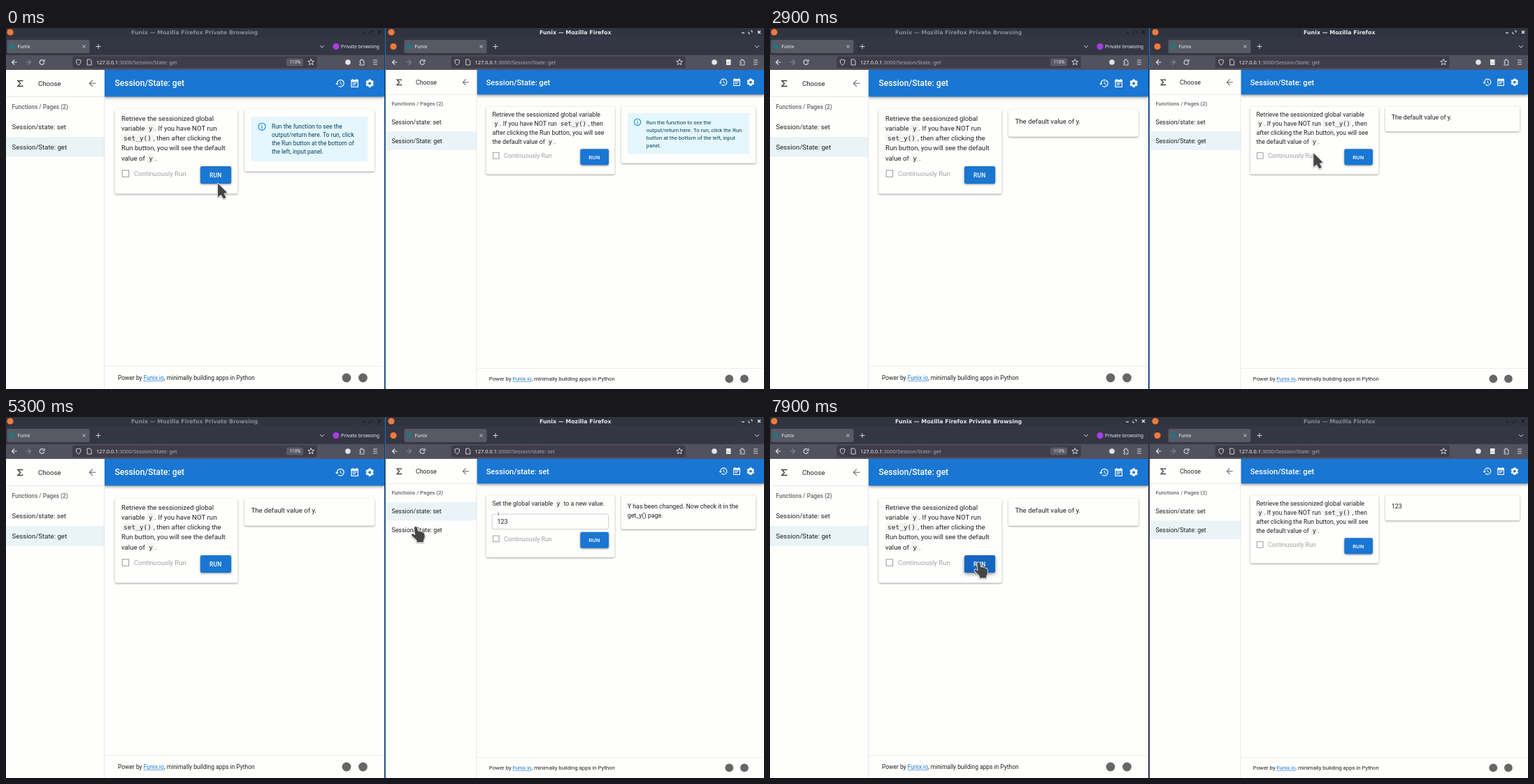
These frames come from a looping animation (1084x517 px, 8 s). An HTML page with a canvas:

```html
<!DOCTYPE html>
<html lang="en">
<head>
<meta charset="utf-8">
<title>Session state demo</title>
<style>
html, body { margin: 0; width: 100%; height: 100%; overflow: hidden; background: #fefefd; }
canvas { display: block; width: 1084px; height: 517px; }
</style>
</head>
<body>
<canvas id="stage"></canvas>
<script>
const W = 1084, H = 517, LOOP = 8000, STEP = 100;
const canvas = document.getElementById('stage');
const dpr = window.devicePixelRatio || 1;
canvas.width = W * dpr;
canvas.height = H * dpr;
const c = canvas.getContext('2d');

const UI = '"Noto Sans", sans-serif', TITLE = '"DejaVu Sans", sans-serif';
const BODY = 'Roboto, sans-serif', MONO = '"DejaVu Sans Mono", monospace';
const BLUE = '#1976d2', DARK_BLUE = '#1565c0', PAPER = '#fefefd', INK = '#212121';
const BASE = 9.65, SMALL = 8.46;
const TOP = 60, RIGHT_X = 543.6, ZOOM = 1.087;

const INFO = 'info';
const DEFAULT = ['The default value of y.'];
const CHANGED = ['Y has been changed. Now check it in the', 'get_y() page.'];
const NUMBER = ['123'];

// Cursor stops: time, x, y
const PATH = [
  [0, 303, 222.5], [100, 304, 221], [500, 304, 221], [600, 303.5, 220], [1300, 303.5, 220],
  [1500, 350, 222], [1800, 640, 213], [2000, 815, 196], [2200, 840.5, 190], [2500, 840.5, 190],
  [2700, 845, 201], [2800, 830, 198], [3100, 672, 142], [3200, 654, 136], [3400, 656, 139],
  [3500, 682, 150], [3800, 815, 172], [4000, 844, 177], [4200, 846.7, 178], [4600, 846.7, 178],
  [4800, 785, 172], [5100, 620, 148], [5300, 586, 157], [6000, 586, 157], [6100, 600, 158],
  [6300, 808, 179], [6400, 836, 184], [6500, 842, 186], [6800, 842, 186], [7000, 690, 195],
  [7300, 106, 203], [7500, 205, 207], [7700, 298, 208.5], [8000, 298.5, 208]
];
const RIPPLES = [
  { start: 3200, release: 3500, x: 654, y: 136, row: 0 },
  { start: 6000, release: 6050, x: 590, y: 157, row: 1 }
];

function cursorAt(t) {
  const i = PATH.findIndex(p => p[0] > t);
  const a = PATH[i - 1], b = PATH[i], k = (t - a[0]) / (b[0] - a[0]);
  return { x: a[1] + (b[1] - a[1]) * k, y: a[2] + (b[2] - a[2]) * k };
}

function rightState(t) {
  const page = t >= 3400 && t < 6100 ? 'set' : 'get';
  const out = t < 2600 ? INFO : t < 3400 ? DEFAULT : t < 4600 ? INFO
    : t < 6100 ? CHANGED : t < 6800 ? INFO : NUMBER;
  return { page, out };
}

const inBox = (p, x, y, w, h) => p.x >= x && p.x < x + w && p.y >= y && p.y < y + h;

function text(s, x, y, size, color, font = BODY, weight = 400) {
  c.font = `${weight} ${size}px ${font}`;
  c.fillStyle = color;
  c.fillText(s, x, y + size * 0.355);
  return c.measureText(s).width;
}
function rect(x, y, w, h, color) {
  c.fillStyle = color;
  c.fillRect(x, y, w, h);
}
function round(x, y, w, h, r, color) {
  c.beginPath();
  c.roundRect(x, y, w, h, r);
  c.fillStyle = color;
  c.fill();
}
function dot(x, y, r, color) {
  c.beginPath();
  c.arc(x, y, r, 0, 7);
  c.fillStyle = color;
  c.fill();
}
function line(color, width, ...paths) {
  c.strokeStyle = color;
  c.lineWidth = width;
  c.beginPath();
  for (const p of paths) {
    for (let i = 0; i < p.length; i += 2) i ? c.lineTo(p[i], p[i + 1]) : c.moveTo(p[i], p[i + 1]);
  }
  c.stroke();
}
function ring(x, y, r, color, width, from = 0, to = Math.PI * 2) {
  c.beginPath();
  c.arc(x, y, r, from, to);
  c.strokeStyle = color;
  c.lineWidth = width;
  c.stroke();
}
function shadow(blur, dy, alpha) {
  c.shadowColor = `rgba(0,0,0,${alpha})`;
  c.shadowBlur = blur * dpr;
  c.shadowOffsetY = dy * dpr;
}
function at(x, y, draw) {
  c.save();
  c.translate(x, y);
  draw();
  c.restore();
}
function raised(x, y, w, h, r, color, blur, dy, alpha) {
  c.save();
  shadow(blur, dy, alpha);
  round(x, y, w, h, r, color);
  c.restore();
}

// Text with `code` spans
function rich(s, x, y) {
  s.split('`').forEach((part, i) => {
    if (i % 2) {
      c.font = `9.5px ${MONO}`;
      const w = c.measureText(part).width;
      round(x, y - 6, w + 6, 12, 2, '#f4f4f3');
      text(part, x + 3, y, 9.5, INK, MONO);
      x += w + 6;
    } else x += text(part, x, y, BASE, INK);
  });
}

function arrowIcon(x, y, dir, color, r = 3.6) {
  line(color, 1.1, [x - r * dir, y, x + r * dir, y], [x, y - r, x + r * dir, y, x, y + r]);
}
function crossIcon(x, y, r, color, width = 0.9) {
  line(color, width, [x - r, y - r, x + r, y + r], [x + r, y - r, x - r, y + r]);
}
function starIcon(x, y) {
  const p = [];
  for (let i = 0; i <= 10; i++) {
    const a = i * Math.PI / 5 - Math.PI / 2, r = i % 2 ? 2 : 4.6;
    p.push(x + r * Math.cos(a), y + r * Math.sin(a));
  }
  line('#e6e6ea', 0.9, p);
}

function chrome(o) {
  const { x, w, focus } = o, light = '#e4e4e9';
  rect(x, 0, w, 13, '#2f343f');
  rect(x, 13, w, 25, '#343743');
  rect(x, 38, w, TOP - 38, '#52525e');
  rect(x, 38, w, 0.6, '#292a33');
  dot(x + (o.right ? 8 : 6), 6, 4.6, '#f5793a');
  text(o.title, o.titleX, 6, 7.88, focus ? '#e9eaec' : '#878b94', TITLE, 700);

  const ctl = focus ? '#f0f0f0' : '#171a20', e = x + w;
  line(ctl, 1.2, [e - 32, 7, e - 28, 7]);
  line(ctl, 1, [e - 20, 8, e - 22, 8, e - 22, 5.5], [e - 19, 4, e - 17, 4, e - 17, 6.5]);
  crossIcon(e - 7, 6, 2, ctl, 1.2);

  const tab = o.tab;
  round(tab, 17, 118, 19, 2.5, '#595964');
  dot(tab + 7, 26.5, 4.2, '#27737f');
  text('Funix', tab + 15, 26.5, 7.1, '#f1f1f3', UI);
  crossIcon(tab + 110, 26.5, 2, light);
  line(light, 0.9, [tab + 127, 26.5, tab + 134, 26.5], [tab + 130.5, 23, tab + 130.5, 30]);
  line(light, 0.9, [o.chevron - 3, 25, o.chevron, 28, o.chevron + 3, 25]);
  if (o.right) dot(554, 26.5, 4.6, '#f5793a');
  else {
    dot(472, 26.5, 4.6, '#a63fe8');
    text('Private browsing', 479, 26.5, 7, '#e8e8ec', UI);
  }

  const n = o.nav;
  arrowIcon(n, 49, -1, light, 3.5);
  arrowIcon(n + 20, 49, 1, '#85858f', 3.5);
  ring(n + 39.5, 49, 3.3, light, 1.1, 0.3, 5.4);
  line(light, 1.1, [n + 43, 45, n + 43, 48, n + 40, 48]);

  const f = o.field;
  round(f, 40.5, o.fieldW, 17, 2.5, '#3e3d49');
  c.beginPath();
  c.moveTo(f + 8.5, 45);
  c.lineTo(f + 12, 46.3);
  c.quadraticCurveTo(f + 12, 51.5, f + 8.5, 53.3);
  c.quadraticCurveTo(f + 5, 51.5, f + 5, 46.3);
  c.closePath();
  c.strokeStyle = light;
  c.lineWidth = 0.9;
  c.stroke();
  line(light, 0.9, [f + 21, 45, f + 25, 45, f + 27, 47, f + 27, 53, f + 21, 53, f + 21, 45]);
  const host = text('127.0.0.1', f + 33.8, 49, 7.45, '#f4f4f6', UI);
  text(`:3000/${o.page === 'set' ? 'Session/state: set' : 'Session/State: get'}`,
    f + 33.8 + host, 49, 7.45, '#adadb6', UI);
  if (!o.right) {
    round(401, 43.5, 24, 11, 2, '#5b5b66');
    text('110%', 405.5, 49, 6.3, '#ececf0', UI);
  }
  starIcon(f + o.fieldW - 8.5, 49);

  const m = o.menu;
  dot(o.pocket, 49, 3.8, light);
  if (o.right) {
    rect(1030, 45, 6.5, 8, '#eeeef0');
    line('#777', 0.6, [1031, 50, 1035.5, 50]);
  }
  line(light, 0.9, [m - 22, 47, m - 20.5, 47, m - 20.5, 45, m - 18, 45, m - 18, 47, m - 16, 47,
    m - 16, 53, m - 22, 53, m - 22, 51, m - 20, 50, m - 22, 49, m - 22, 47]);
  line(light, 0.9, [m - 3, 46, m + 3, 46], [m - 3, 49, m + 3, 49], [m - 3, 52, m + 3, 52]);
}

function barIcons(w) {
  const x = w - 63.3, y = 19.2;
  ring(x + 0.6, y, 4.9, '#fff', 1.25, -Math.PI, 2.3);
  line('#fff', 1, [x + 0.5, y - 2.7, x + 0.5, y + 0.4, x + 3, y + 1.9]);
  c.fillStyle = '#fff';
  c.beginPath();
  c.moveTo(x - 6.8, y);
  c.lineTo(x - 2, y);
  c.lineTo(x - 4.4, y + 2.6);
  c.fill();

  at(w - 42.3, y, () => {
    c.strokeStyle = '#fff';
    c.lineWidth = 1.2;
    c.strokeRect(-4.7, -4.4, 9.4, 9.6);
    rect(-5, -5, 10, 3, '#fff');
    rect(-3.6, -6.3, 1.3, 2, '#fff');
    rect(2.3, -6.3, 1.3, 2, '#fff');
    rect(-2.9, -0.8, 5.8, 1.2, '#fff');
    rect(-2.9, 1.6, 4, 1.2, '#fff');
  });

  at(w - 20.8, y, () => {
    ring(0, 0, 3.4, '#fff', 2.7);
    for (let i = 0; i < 6; i++) {
      c.rotate(Math.PI / 3);
      rect(-1.6, -5.8, 3.2, 2.4, '#fff');
    }
  });
}

function alertBox(x, w) {
  round(x, 67, w, 64, 2, '#e5f6fd');
  ring(x + 15.5, 81.3, 5.1, '#0288d1', 1.1);
  rect(x + 14.9, 80.6, 1.2, 3.6, '#0288d1');
  rect(x + 14.9, 78.2, 1.2, 1.2, '#0288d1');
}

function sidebar(o) {
  rect(0, 0, 141, o.h, PAPER);
  line('#444', 1.5, [23.6, 16.6, 23.6, 15.4, 17, 15.4, 20.6, 19.4, 17, 23.4, 23.6, 23.4, 23.6, 22.2]);
  text('Choose', 46, 19.2, BASE, INK);
  arrowIcon(124, 19.2, -1, '#666', 4.6);
  rect(0, 38, 141, 0.7, '#dfdfdf');
  text('Functions / Pages (2)', 8.5, 53, 8.36, '#666', BODY, 500);
  rect(0, o.page === 'set' ? 67.3 : 96, 141, 28.6, '#e9f3f8');
  for (const r of o.ripples || []) {
    const age = o.t - r.start;
    const alpha = 0.2 * Math.min(1, 1 - (o.t - r.release) / 420);
    if (age < 0 || alpha <= 0) continue;
    c.save();
    c.beginPath();
    c.rect(0, r.row ? 96 : 67.3, 141, 28.6);
    c.clip();
    const grow = 1 - (1 - Math.min(1, age / 550)) ** 1.25;
    dot((r.x - RIGHT_X) * ZOOM, (r.y - TOP) * ZOOM, 135 * grow, `rgba(0,0,0,${alpha})`);
    c.restore();
  }
  text('Session/state: set', 8.5, 81.6, BASE, INK);
  text('Session/State: get', 8.5, 110.3, BASE, INK);
  rect(140.3, 0, 0.7, o.h, '#dcdcdc');
}

// Page body in its own units, origin at the page's top left
function page(o) {
  const { w, h } = o, set = o.page === 'set';
  rect(0, 0, w, h, PAPER);

  raised(155.5, 57, o.cardW, o.cardH, 2.5, PAPER, 2.5, 1, 0.38);
  if (set) {
    rich('Set the global variable `y` to a new value.', 165, 69.4);
    c.beginPath();
    c.roundRect(164.8, 86, 180.8, 23.4, 2.5);
    c.strokeStyle = '#bdbdbd';
    c.lineWidth = 0.8;
    c.stroke();
    rect(171, 84, 7, 4, PAPER);
    text('x', 172.6, 86, 7.2, '#666');
    text('123', 172.8, 97.8, BASE, INK);
  } else o.lines.forEach((s, i) => rich(s, 165, 69.4 + i * 14.2));

  const by = 57 + o.cardH - 39.5, bx = 155.5 + o.cardW - 53.6;
  c.strokeStyle = '#a8a8a8';
  c.lineWidth = 1.2;
  c.strokeRect(166.2, by + 5.8, 9.4, 9.4);
  text('Continuously Run', 183, by + 10.5, BASE, '#a2a2a2');
  raised(bx, by, 44.2, 25, 2.5, o.hover ? DARK_BLUE : BLUE, o.hover ? 5 : 3, o.hover ? 2 : 1, 0.42);
  c.letterSpacing = '0.24px';
  text('RUN', bx + 13, by + 12.7, SMALL, '#fff', BODY, 500);
  c.letterSpacing = '0px';

  const info = o.out === INFO;
  const outH = info ? 88.4 : o.out.length > 1 ? 52.4 : 38.8;
  raised(o.outX, 57, o.outW, outH, 2.5, PAPER, 2.5, 1, 0.38);
  if (info) {
    alertBox(o.outX + 9.6, o.outW - 19.4);
    o.help.forEach((s, i) => text(s, o.outX + 39, 81.3 + i * 11.95, SMALL, '#014361'));
  } else o.out.forEach((s, i) => text(s, o.outX + 9.5, 73.8 + i * 14.2, BASE, INK));

  rect(141, h - 32.6, w - 141, 0.7, '#e6e6e6');
  let fx = 160;
  fx += text('Power by ', fx, h - 16, SMALL, INK);
  const linkW = text('Funix.io', fx, h - 16, SMALL, BLUE);
  rect(fx, h - 12, linkW, 0.6, BLUE);
  text(', minimally building apps in Python', fx + linkW, h - 16, SMALL, INK);
  dot(w - 54, h - 16, 6.4, '#666');
  dot(w - 30.5, h - 16, 6.4, '#666');

  c.save();
  shadow(4, 1.5, 0.4);
  rect(141, 0, w - 141, 38.4, BLUE);
  c.restore();
  sidebar(o);
  text(set ? 'Session/state: set' : 'Session/State: get', 155.5, 19.2, 12.08, '#fff', BODY, 500);
  barIcons(w);
}

const ARROW = new Path2D('M0 0V19.5L4.5 16.2 8.2 22 11.6 20.2 8.6 14.6 13 13Z');
const HAND = new Path2D('M-2 1.2Q0-1.4 2 1.2L3 7Q5 5.8 6.6 7.6 8.6 6.8 9.8 8.8 12 8.4 12.4 11' +
  'L12.8 15Q12.6 17.4 11 19V22.3H1.5V19.6L-5.8 12.4Q-6.2 9.6-3.4 10.4L-.8 12.4Z');

function pointer(p, hand) {
  at(p.x, p.y, () => {
    const shape = hand ? HAND : ARROW;
    c.lineJoin = 'round';
    c.save();
    shadow(2, 1, 0.35);
    c.strokeStyle = '#f4f4f4';
    c.lineWidth = 1.6;
    c.stroke(shape);
    c.restore();
    c.fillStyle = '#454545';
    c.fill(shape);
  });
}

const LEFT = {
  x: 0, w: 541, title: 'Funix — Mozilla Firefox Private Browsing', titleX: 179, tab: 1.5,
  chevron: 452, nav: 12, field: 95.2, fieldW: 349.5, pocket: 489, menu: 528
};
const RIGHT = {
  x: 543, w: 541, right: true, title: 'Funix — Mozilla Firefox', titleX: 763, tab: 569.5,
  chevron: 1074, nav: 556, field: 636.7, fieldW: 335, pocket: 1013, menu: 1072
};
const LEFT_PAGE = {
  w: 541, h: 457, cardW: 176, cardH: 120.5, outX: 341, outW: 186,
  lines: ['Retrieve the sessionized global', 'variable `y`. If you have NOT run',
    '`set_y()`, then after clicking the', 'Run button, you will see the default', 'value of `y`.'],
  help: ['Run the function to see the', 'output/return here. To run, click',
    'the Run button at the bottom of', 'the left, input panel.']
};
const RIGHT_PAGE = {
  w: 587.4, h: 496.8, cardW: 200, outX: 365.6, outW: 209,
  lines: ['Retrieve the sessionized global variable', '`y`. If you have NOT run `set_y()`, then',
    'after clicking the Run button, you will see', 'the default value of `y`.'],
  help: ['Run the function to see the', 'output/return here. To run, click the Run',
    'button at the bottom of the left, input', 'panel.']
};

function draw(t) {
  const cur = cursorAt(t), right = rightState(t);
  const leftFocus = (t >= 1000 && t < 2300) || t >= 7800;
  const hoverL = inBox(cur, 278, 198, 44, 24);
  const hoverR = inBox(cur, 821, right.page === 'set' ? 165 : 173.5, 41, 23);
  const onRow = inBox(cur, 543, 122, 130, 52) || inBox(cur, 0, 127, 141, 57);

  c.setTransform(dpr, 0, 0, dpr, 0, 0);
  rect(0, 0, W, H, PAPER);
  at(0, TOP, () => page({
    ...LEFT_PAGE, t, page: 'get', hover: hoverL, out: t < 1400 ? INFO : DEFAULT
  }));
  at(RIGHT_X, TOP, () => {
    c.scale(1 / ZOOM, 1 / ZOOM);
    page({
      ...RIGHT_PAGE, ...right, t, hover: hoverR, ripples: RIPPLES,
      cardH: right.page === 'set' ? 96.3 : 105.5
    });
  });
  chrome({ ...LEFT, focus: leftFocus, page: 'get' });
  chrome({ ...RIGHT, focus: !leftFocus, page: right.page });
  rect(543, right.page === 'get' ? 148.3 : 121.9, 1, 26.3, '#e9f3f8');
  rect(541, 0, 1, H, '#30343f');
  rect(542, 0, 1, H, leftFocus ? '#30343f' : '#1b75c4');
  pointer(cur, hoverL || hoverR || onRow);
}

function tick() {
  draw(Math.floor(performance.now() % LOOP / STEP) * STEP);
  requestAnimationFrame(tick);
}
tick();
</script>
</body>
</html>
```
